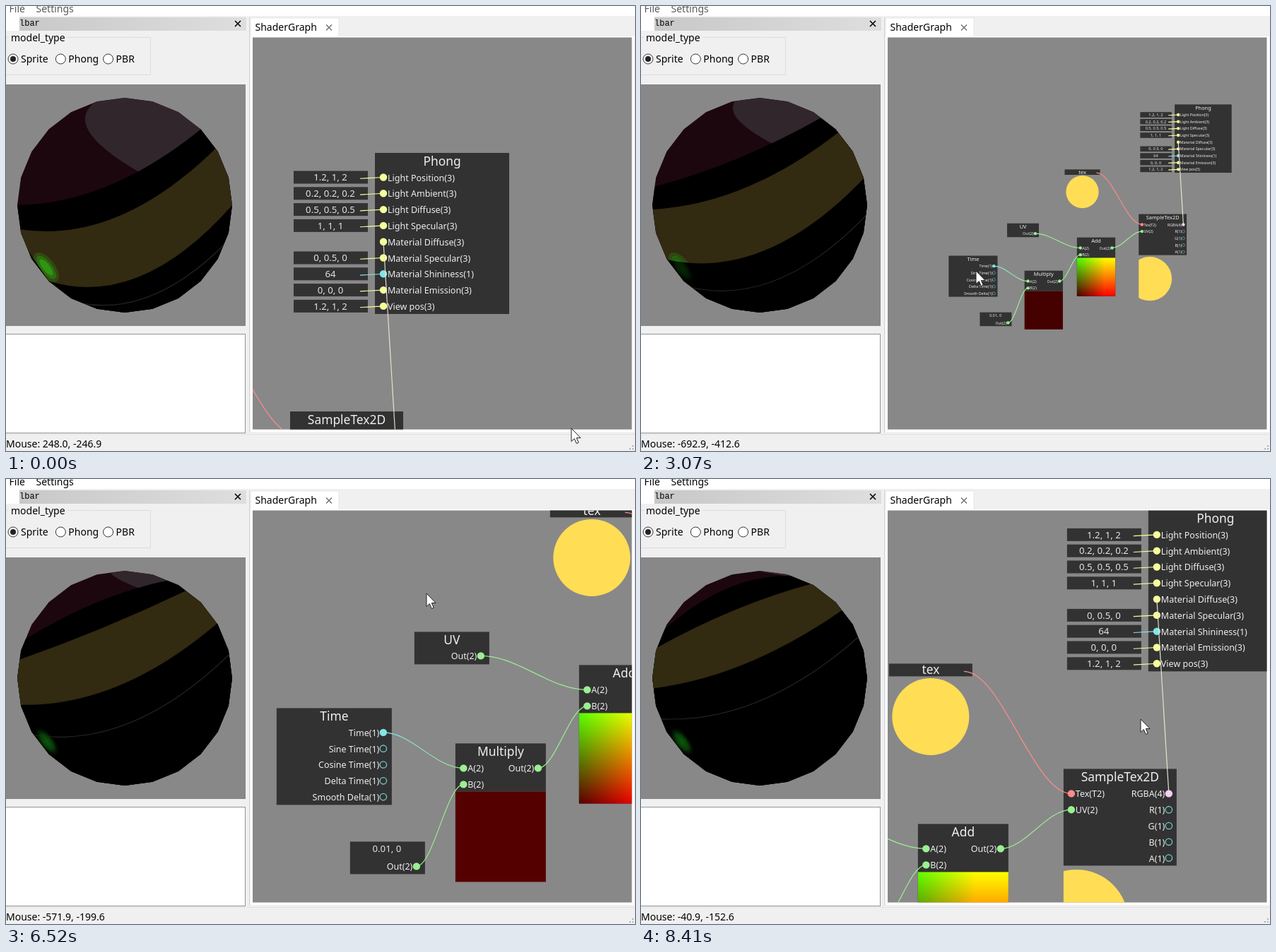
An HTML page that plays this animation: 890x630 px, repeating every 8480 ms.

```html
<!DOCTYPE html>
<html lang="en">
<head>
<meta charset="utf-8">
<title>Shader editor</title>
<style>
  html, body { margin: 0; width: 100%; height: 100%; overflow: hidden; background: #f0f0f0; }
  svg { display: block; }
  text { font-family: "Noto Sans", "Open Sans", sans-serif; white-space: pre; }
  .ui { font-size: 14px; fill: #000; }
  .title { font-size: 17.4px; fill: #eee; text-anchor: middle; }
  .label { font-size: 12.5px; fill: #eee; }
  .value { font-size: 13.2px; fill: #e4e4e4; text-anchor: middle; }
  .end { text-anchor: end; }
  .wire { fill: none; stroke-width: 1.15; vector-effect: non-scaling-stroke; }
  .mix { isolation: isolate; }
  .screen { mix-blend-mode: screen; }
</style>
</head>
<body>
<svg id="stage" width="890" height="630" viewBox="0 0 890 630">
  <defs>
    <clipPath id="canvasClip"><rect x="349" y="44.500" width="536.500" height="555"/></clipPath>
    <clipPath id="sampleClip"><rect x="-120" y="503" width="160" height="160"/></clipPath>
    <clipPath id="ballClip"><polygon id="ballOutline"/></clipPath>
    <linearGradient id="dockBar"><stop stop-color="#c8c8c8"/><stop offset="1" stop-color="#dedede"/></linearGradient>
    <linearGradient id="redRamp"><stop id="redLow"/><stop id="redHigh" stop-color="#f00"/></linearGradient>
    <linearGradient id="greenRamp" x2="0" y2="1"><stop stop-color="#0f0"/><stop offset="1"/></linearGradient>
    <linearGradient id="timeWire"><stop stop-color="#84e4e7"/><stop offset="1" stop-color="#9aef92"/></linearGradient>
    <radialGradient id="glow"><stop stop-color="#0a5a0c"/><stop offset=".5" stop-color="#083c08"/><stop offset="1" stop-color="#041804" stop-opacity="0"/></radialGradient>
  </defs>

  <rect width="890" height="630" fill="#f0f0f0"/>
  <rect width="890" height="14" fill="#fff"/>
  <g id="menu"><text class="ui" x="4.5" y="9">File</text><text class="ui" x="42.5" y="9">Settings</text></g>

  <rect x="19" y="16" width="321" height="19" fill="url(#dockBar)"/>
  <rect y="14" width="19" height="21" fill="#fff"/>
  <text x="19" y="28" style="font:12px 'Liberation Mono',monospace">lbar</text>
  <path d="M324 21l8 8m0-8l-8 8" stroke="#000" stroke-width="1.600"/>

  <path d="M0 44.500H4M87 44.500H204.500V97.500H0" fill="none" stroke="#dcdcdc"/>
  <text class="ui" x="7" y="50">model_type</text>
  <g id="radios"></g>

  <rect y="111" width="339" height="342" fill="#888"/>
  <g clip-path="url(#ballClip)">
    <rect y="111" width="339" height="342" fill="#1c070f"/>
    <path id="patch" fill="#31262b"/>
    <path id="bandTop"/>
    <path id="bandGold" fill="#322a11"/>
    <g transform="translate(57 370) rotate(52)">
      <ellipse rx="25" ry="12" fill="#2f4a10"/>
      <ellipse rx="20" ry="8" fill="#2d6c10"/>
      <ellipse rx="14" ry="5" fill="#2f9412"/>
    </g>
    <path id="bandLow"/>
    <path id="seam" fill="none" stroke="#242420" stroke-width="1.200"/>
    <ellipse id="dimGlow" rx="25" ry="11" fill="url(#glow)" transform="translate(58 372) rotate(52)"/>
  </g>
  <rect x="-.5" y="464.500" width="339" height="140" fill="#fff" stroke="#90949a"/>

  <path d="M344.500 16V604" stroke="#d4d4d4"/>
  <rect x="346" y="17" width="125" height="28" fill="#fff" stroke="#d9d9d9" stroke-width=".6"/>
  <rect x="346" y="43" width="543" height="560" fill="#fff"/>
  <text class="ui" x="352.500" y="35">ShaderGraph</text>
  <path d="M453 26.500l8 8m0-8l-8 8" stroke="#777" stroke-width="1.600"/>
  <g clip-path="url(#canvasClip)">
    <rect x="349" y="44" width="537" height="556" fill="#888"/>
    <g id="world"></g>
  </g>

  <path d="M0 606.500H890" stroke="#e2e2e2"/>
  <text id="status" class="ui" x="0" y="625"></text>
  <path d="M887 622v2m0 2v2m-4-2v2" stroke="#b0b0b0" stroke-width="2"/>
  <path id="cursor" d="M0 0V18.500L4.300 14.600 7.300 21.500 10.200 20.200 7.300 13.500H13Z" fill="#fff" stroke="#222"/>
</svg>
<script>
const LOOP = 8480;
const ROW = 22.8;
const COLOR = { f: '#84e4e7', v2: '#9aef92', v3: '#f6ff9a', v4: '#fbcbf4', tex: '#ff8b8b' };
const BALL = { x: 168, y: 282, r: 152, sides: 24 };
const $ = id => document.getElementById(id);
const lerp = (a, b, u) => a + (b - a) * u;
const clamp = v => Math.max(0, Math.min(1, v));

// Building blocks of the node graph
const text = (cls, x, y, s) => `<text class="${cls}" x="${x}" y="${y}">${s}</text>`;
const box = (x, y, w, h) => `<rect x="${x}" y="${y}" width="${w}" height="${h}" fill="#323232"/>`;
const node = (x, y, w, h, title) => box(x, y, w, h) + text('title', x + w / 2, y + 17.5, title);
const dot = (x, y, color) => `<circle cx="${x}" cy="${y}" r="5.2" fill="${color}"/>`;
const ring = (x, y) => `<circle cx="${x}" cy="${y}" r="4.7" fill="none" stroke="${COLOR.f}" stroke-width="1.3" opacity=".85"/>`;
const input = (x, y, color, name) => dot(x, y, color) + text('label', x + 6, y + 5, name);
const output = (x, y, color, name) => (color ? dot(x, y, color) : ring(x, y)) + text('label end', x - 5.5, y + 5, name);
const disc = (id, x, y, r) => `<circle id="${id}" cx="${x}" cy="${y}" r="${r}" fill="#ffdd55"/>`;

function wire(x1, y1, x2, y2, color, bend = 0.35) {
  const h = (x2 - x1) * bend;
  return `<path class="wire" d="M${x1} ${y1}C${x1 + h} ${y1} ${x2 - h} ${y2} ${x2} ${y2}" stroke="${color}"/>`;
}

function operator(x, y, title) {
  return node(x, y, 128, 68, title) + input(x + 11.5, y + 35, COLOR.v2, 'A(2)') +
    input(x + 11.5, y + 58, COLOR.v2, 'B(2)') + output(x + 117, y + 35, COLOR.v2, 'Out(2)');
}

function phong() {
  const rows = [
    ['Light Position', '1.2, 1, 2'], ['Light Ambient', '0.2, 0.2, 0.2'],
    ['Light Diffuse', '0.5, 0.5, 0.5'], ['Light Specular', '1, 1, 1'],
    ['Material Diffuse', ''], ['Material Specular', '0, 0.5, 0'],
    ['Material Shininess', '64'], ['Material Emission', '0, 0, 0'], ['View pos', '1.2, 1, 2']
  ];
  return node(0, 0, 190, 228, 'Phong') + rows.map(([name, value], i) => {
    const y = 34.5 + ROW * i, scalar = value === '64', color = scalar ? COLOR.f : COLOR.v3;
    const constant = value && box(-115, y - 9, 105, 18) + text('value', -63, y + 4.8, value) +
      wire(-21, y + 1.8, 12, y, color, 0);
    return constant + input(12, y, color, `${name}(${scalar ? 1 : 3})`);
  }).join('');
}

function buildScene() {
  const times = ['Time', 'Sine Time', 'Cosine Time', 'Delta Time', 'Smooth Delta'];
  const channels = ['RGBA(4)', 'R(1)', 'G(1)', 'B(1)', 'A(1)'];
  $('world').innerHTML =
    phong() +
    node(-120, 366, 160, 137, 'SampleTex2D') +
    input(-109, 401, COLOR.tex, 'Tex(T2)') + input(-109, 401 + ROW, COLOR.v2, 'UV(2)') +
    channels.map((c, i) => output(29, 401 + ROW * i, i ? '' : COLOR.v4, c)).join('') +
    `<g clip-path="url(#sampleClip)">${disc('sampleDisc', -75, 582, 73.5)}</g>` +
    box(-367, 217, 118, 18) + text('title', -308, 232, 'tex') + disc('texDisc', -308, 292, 54.5) +
    node(-559, 397, 106, 46, 'UV') + output(-465, 431, COLOR.v2, 'Out(2)') +
    operator(-326, 444, 'Add') +
    '<g class="mix"><rect x="-326" y="512" width="128" height="128" fill="url(#redRamp)"/>' +
    '<rect class="screen" x="-326" y="512" width="128" height="128" fill="url(#greenRamp)"/></g>' +
    operator(-501, 555, 'Multiply') + '<rect id="product" x="-501" y="623" width="128" height="128"/>' +
    node(-754, 505, 163, 137, 'Time') +
    times.map((n, i) => output(-603, 539.5 + ROW * i, i ? '' : COLOR.f, n + '(1)')).join('') +
    box(-650, 694, 106, 46) + text('value', -598, 708.5, '0.01, 0') + output(-556, 729, COLOR.v2, 'Out(2)') +
    wire(-261, 228, -109, 401, COLOR.tex) +
    wire(-465, 431, -314.5, 479, COLOR.v2) +
    wire(-603, 539.5, -489.5, 590, 'url(#timeWire)') +
    wire(-556, 729, -489.5, 613, COLOR.v2) +
    wire(-384, 590, -314.5, 502, COLOR.v2) +
    wire(-209, 479, -109, 401 + ROW, COLOR.v2) +
    wire(29, 401, 12, 125.7, '#e9e4d2', 0);

  $('radios').innerHTML = ['Sprite', 'Phong', 'PBR'].map((name, i) => {
    const x = 10 + 67.3 * i;
    return `<circle cx="${x}" cy="75" r="7" fill="#fff" stroke="#333"/>` +
      (i ? '' : `<circle cx="${x}" cy="75" r="4" fill="#222"/>`) + text('ui', x + 11, 80, name);
  }).join('');

  const corners = Array.from({ length: BALL.sides }, (_, i) => onBall(360 * i / BALL.sides));
  $('ballOutline').setAttribute('points', corners.join(' '));
}

// Pointer gestures in order; "go" moves it, "wheel" zooms around it, "drag" takes the graph along
const GESTURES = [
  { from: 0, to: 400, go: [781, 161] },
  { from: 450, to: 1000, wheel: -7 },
  { from: 1000, to: 1110, go: [746, 219] },
  { from: 1130, to: 1500, wheel: -5 },
  { from: 1500, to: 2260, go: [453, 434] },
  { from: 2300, to: 2800, go: [474, 375] },
  { from: 2840, to: 3550, wheel: 10 },
  { from: 3750, to: 4000, wheel: 2 },
  { from: 4600, to: 6500, go: [595, 162] },
  { from: 6550, to: 6900, go: [687, 132] },
  { from: 6900, to: 7560, drag: [394, 273] },
  { from: 7600, to: 8000, go: [833, 256] },
  { from: 8000, to: 8400, drag: [707, 340] }
];

function viewAt(t) {
  let px = 800, py = 599, x = 522, y = 208, zoom = 1;
  for (const { from, to, go, wheel, drag } of GESTURES) {
    const u = clamp((t - from) / (to - from));
    if (wheel) {
      const k = 1.1 ** Math.round(wheel * u);
      x = lerp(px, x, k);
      y = lerp(py, y, k);
      zoom *= k;
      continue;
    }
    const [tx, ty] = go || drag;
    const dx = (tx - px) * u, dy = (ty - py) * u;
    px += dx;
    py += dy;
    if (drag) { x += dx; y += dy; }
  }
  return { px, py, x, y, zoom };
}

function onBall(degrees) {
  const a = degrees * Math.PI / 180;
  return [BALL.x + BALL.r * Math.cos(a), BALL.y - BALL.r * Math.sin(a)];
}

// Band edge: parallel chords across the ball, bowed by their distance from its centre
function edge(angle, s) {
  const [x0, y0] = onBall(225 - angle), [x1, y1] = onBall(angle);
  const bow = 42 * Math.cos((angle - 10) * Math.PI / 100) + 1.5 * (4.5 - s);
  return `M${x0} ${y0}Q${(x0 + x1) / 2} ${(y0 + y1) / 2 + 2 * bow} ${x1} ${y1}`;
}
const below = d => d + 'L340 100V460H0V300Z';

function render(t) {
  const s = t / 1000;
  const { px, py, x, y, zoom } = viewAt(t);
  $('world').setAttribute('transform', `translate(${x} ${y}) scale(${zoom})`);
  $('cursor').setAttribute('transform', `translate(${px} ${py})`);
  const mouse = [(px - x) / zoom - 30, 143 - (py - y) / zoom];
  $('status').textContent = 'Mouse: ' + mouse.map(v => v.toFixed(1)).join(', ');
  $('menu').setAttribute('opacity', t < 5000 ? 0.65 : 1);

  const red = Math.round(55.5 + 4.5 * s);
  $('product').setAttribute('fill', `rgb(${red},0,0)`);
  $('redLow').setAttribute('stop-color', `rgb(${red},0,0)`);
  $('redHigh').setAttribute('offset', 1 - red / 255);
  $('sampleDisc').setAttribute('cx', -72 - 3.55 * s);

  $('patch').setAttribute('d', `M145 125Q${55 + 13 * s} ${165 - 4 * s} 210 ${247 - 13 * s}H320V100Z`);
  $('bandTop').setAttribute('d', below(edge(45 + 3.2 * s, s)));
  $('bandGold').setAttribute('d', below(edge(32 + 3.5 * s, s)));
  $('bandLow').setAttribute('d', below(edge(4.7 * s, s)));
  $('seam').setAttribute('d', edge(-21 + 5.2 * s, s));
  $('dimGlow').setAttribute('opacity', clamp((s - 2.4) / 1.5));
}

buildScene();
const start = performance.now();
function tick() {
  render((performance.now() - start) % LOOP);
  requestAnimationFrame(tick);
}
tick();
</script>
</body>
</html>
```
